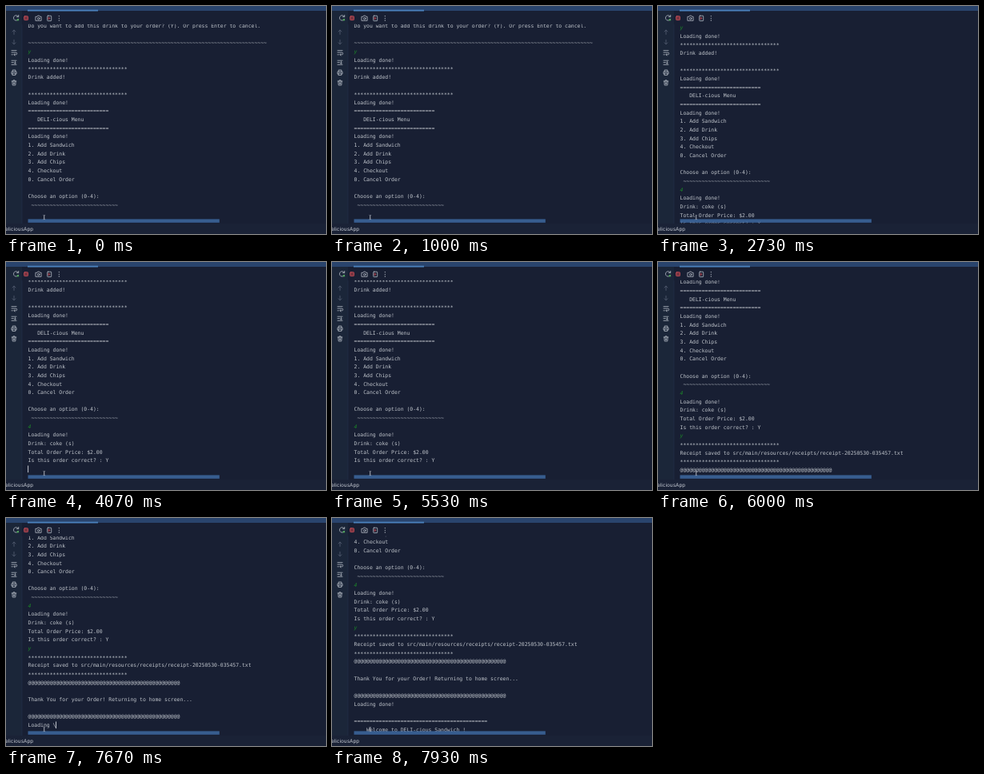
These frames come from a looping animation (400x285 px, 8 s). An HTML page:

```html
<!DOCTYPE html>
<html lang="en">
<head>
<meta charset="utf-8">
<title>Console order</title>
<style>
  html, body { margin: 0; width: 100%; height: 100%; overflow: hidden; background: #181f33; }
  svg { display: block; width: 400px; height: 285px; }
  text { white-space: pre; text-rendering: geometricPrecision; }
  #rows text { font: 6.445px "DejaVu Sans Mono", monospace; fill: #bfc4cb; }
  #rows text.input { fill: #1c8a28; font-style: italic; }
  .icon { fill: none; stroke: #b4bac4; stroke-width: .8; stroke-linecap: round; stroke-linejoin: round; }
  .dim { stroke: #566074; }
</style>
</head>
<body>
<svg viewBox="0 0 400 285">
  <defs><clipPath id="view"><rect x="21" y="22.8" width="379" height="248.7"/></clipPath></defs>

  <rect width="400" height="285" fill="#181f33"/>
  <rect y="6" width="20" height="266" fill="#1b2639"/>
  <rect x="19.6" y="23" width=".7" height="249" fill="#24304a"/>
  <rect width="400" height="6" fill="#29446d"/>
  <rect x="27" y="4.7" width="88" height="1.8" fill="#4b82bd"/>

  <g class="icon">
    <path d="M15.4 13.2A3.2 3.2 0 1 0 15.6 16.2M15.7 11.4v2.2h-2.2"/>
    <circle cx="14.8" cy="17.2" r="1.3" fill="#4fa35a" stroke="none"/>
    <rect x="22.6" y="12.7" width="4.9" height="4.9" rx=".8" fill="#7d3440" stroke="#c9515b"/>
    <path d="M37.3 13.3h1.6l.8-1.2h2l.8 1.2h1.6v5h-6.8z"/>
    <circle cx="40.7" cy="15.7" r="1.3"/>
    <rect x="51.7" y="12.2" width="5" height="6.4" rx=".7"/>
    <path d="M53.4 14.2l1.7 1.2l-1.7 1.2z" stroke="#c9515b"/>
    <path d="M66.3 12.6v0M66.3 15.3v0M66.3 18v0" stroke-width="1.3"/>

    <path class="dim" d="M10 35.5v-5.4M8 32l2-2l2 2M10 42.3v5.4M8 45.8l2 2l2-2"/>
    <path d="M7 55.6h6M7 58h5.3a1.3 1.3 0 0 1 0 2.8h-2M11 59.6l-1.2 1.2l1.2 1.2M7 60.8h1.3"/>
    <path d="M7 68.2h6M7 70.6h2.3M7 73.3h6M11.4 69.4v2.7M10.3 71l1.1 1.1l1.1-1.1"/>
    <path d="M8.2 82v-2h3.7v2M8.2 85H7v-3h6v3h-1.2M8.3 84h3.5v2.4H8.3z"/>
    <path d="M7.2 94h5.6M9 94v-1.2h2V94M7.8 94l.4 5h3.6l.4-5M9.4 95.8v1.6M10.6 95.8v1.6"/>
  </g>

  <g clip-path="url(#view)">
    <g id="rows"></g>
    <rect id="caret" width=".9" height="8.6" fill="#d5d9e0"/>
  </g>

  <rect x="27.5" y="266.4" width="239.3" height="4.4" fill="#3c669c" opacity=".88"/>
  <path d="M46.5 261.4q1.2 0 1.2 .9v3.6q0 .9-1.2 .9M48.9 261.4q-1.2 0-1.2 .9v3.6q0 .9 1.2 .9"
        fill="none" stroke="#b9bec8" stroke-width=".6"/>
  <rect y="272" width="400" height="13" fill="#1a2236"/>
  <text x="-1" y="281.2" font-family="Inter, sans-serif" font-size="6.4" fill="#c4c9d2">eliciousApp</text>
</svg>

<script>
const LOOP = 8000, FPS = 15, PITCH = 10.66, LEFT = 27.5, CHAR = 3.88;
const PROMPT_ROW = 20;
const stars = "*".repeat(32), bar = "=".repeat(26), ats = "@".repeat(49);
const done = "Loading done!";

const lines = [
  "Do you want to add this drink to your order? (Y). Or press Enter to cancel.",
  "", "~".repeat(77), ">y", done, stars, "Drink added!", "", stars, done,
  bar, "   DELI-cious Menu", bar, done,
  "1. Add Sandwich", "2. Add Drink", "3. Add Chips", "4. Checkout", "0. Cancel Order", "",
  "Choose an option (0-4):", " " + "~".repeat(28), ">4", done,
  "Drink: coke (s)", "Total Order Price: $2.00", "Is this order correct? : Y", ">y",
  stars, "Receipt saved to src/main/resources/receipts/receipt-20250530-035457.txt", stars,
  ats, "", "Thank You for your Order! Returning to home screen...", "", ats, done,
  "", "=".repeat(43), "    Welcome to DELI-cious Sandwich !"
];

// [time, number of printed rows]
const printed = [[0, 22], [1800, 24], [2600, 27], [5730, 37], [7730, 40]];
// [start, end, y of the prompt row at the end]
const scrolls = [[0, 0, 237.9], [1800, 1800, 227.3], [2570, 3210, 184.3],
                 [5680, 6000, 142.5], [6080, 6530, 88.3], [7730, 7730, 62]];
// [time, row, glyph]; an empty glyph ends the spinner
const spins = [[0, 0, ""], [1800, 23, "|"], [2000, 23, "/"], [2600, 0, ""],
               [5730, 36, "|"], [6730, 36, "/"], [7000, 36, "-"], [7270, 36, "\\"], [7730, 0, ""]];
// [time, caret row, caret column]; row -1 hides it
const carets = [[0, -1, 0], [1530, 22, 0], [1800, 23, 9], [2600, -1, 0], [3200, 27, 0],
                [5530, -1, 0], [6530, 36, 9], [7730, -1, 0]];

const rows = document.getElementById("rows");
const caret = document.getElementById("caret");

const texts = lines.map((line, i) => {
  const el = document.createElementNS("http://www.w3.org/2000/svg", "text");
  const input = line[0] === ">";
  el.textContent = input ? line.slice(1) : line;
  if (input) el.setAttribute("class", "input");
  el.setAttribute("x", LEFT);
  el.setAttribute("y", i * PITCH + 2.2 + (line === stars ? 0.8 : 0));
  return rows.appendChild(el);
});

const current = (table, t) => table.filter(step => step[0] <= t).pop();

function promptY(t) {
  let y = scrolls[0][2];
  for (const [start, end, target] of scrolls) {
    if (t < start) break;
    const p = end > start ? Math.min(1, (t - start) / (end - start)) : 1;
    y += (target - y) * (1 - (1 - p) ** 2);
  }
  return y;
}

function draw(time) {
  const t = Math.floor(time * FPS / 1000 + 0.1) * 1000 / FPS;
  const top = promptY(t) - PROMPT_ROW * PITCH;
  const count = current(printed, t)[1];
  const [, spinRow, glyph] = current(spins, t);
  const [, caretRow, col] = current(carets, t);

  rows.setAttribute("transform", `translate(0 ${top})`);
  texts.forEach((el, i) => {
    el.style.display = i < count ? "" : "none";
    if (lines[i] === done) el.textContent = glyph && i === spinRow ? "Loading " + glyph : done;
  });
  caret.style.display = caretRow < 0 ? "none" : "";
  caret.setAttribute("x", LEFT + col * CHAR - 0.3);
  caret.setAttribute("y", top + caretRow * PITCH - 4.4);
}

const began = performance.now();
function tick() {
  draw((performance.now() - began) % LOOP);
  requestAnimationFrame(tick);
}
tick();
</script>
</body>
</html>
```
